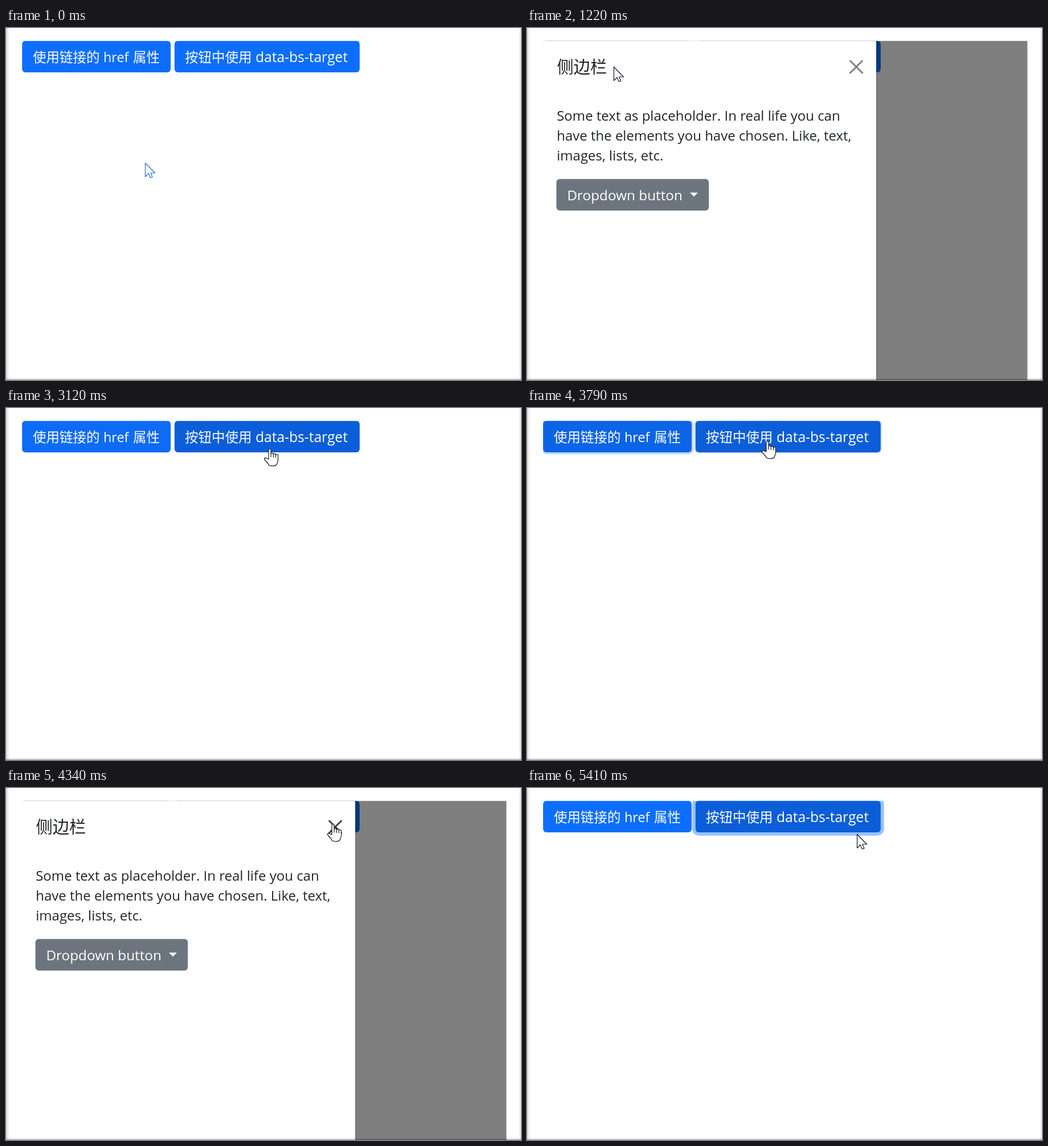
An HTML page with a canvas for the animation above (5.49 s loop, 904 by 619 pixels).

```html
<!DOCTYPE html>
<html lang="zh-CN">
<head>
<meta charset="utf-8">
<title>Offcanvas demo</title>
<style>
html, body { margin: 0; width: 100%; height: 100%; overflow: hidden; background: #fff; }
canvas { display: block; }
</style>
</head>
<body>
<canvas id="stage" width="904" height="619"></canvas>
<script>
const ctx = document.getElementById('stage').getContext('2d');
const LOOP = 5490, STEP = 67.7, REM = 23.4;
const VIEW = { x: 28, y: 22.4, w: 850.6, h: 597 };
const PANEL_W = 585, SLIDE = 300, FADE = 150;
const BUTTON_Y = 22.4, BUTTON_H = 55.5;
const VISITS = [{ open: 870, close: 2765, press: 2630 }, { open: 3826, close: 4900, press: 4800 }];

// Pointer path: time, x, y
const PATH = [
  [0, 244, 237], [340, 203, 150], [610, 152, 66], [1150, 152, 66], [1215, 152, 68],
  [1420, 152, 68], [1624, 435, 65], [1760, 435, 65], [2110, 595, 72], [2500, 595, 72],
  [2570, 591, 72], [2772, 591, 72], [3114, 463, 71], [3250, 452, 65], [3385, 422, 58],
  [3980, 422, 58], [4265, 564, 63], [4330, 574, 63], [5280, 574, 63], [5345, 576, 72],
  [5410, 579, 81], [LOOP, 579, 81]
];
const ARROW = new Path2D('M.5 .5V24.5L6 19L9.5 26.5L13 25L9.7 18H17.5Z');
const HAND = new Path2D('M-2 19V2.6a2 2 0 0 1 4 0V10a2.1 2.1 0 0 1 4.3 1a2.1 2.1 0 0 1 4.2 1' +
  'a2 2 0 0 1 4 1.5V21c0 3-1.5 4-2 6.5q-1 3.5-8 3.5t-7-3.5L-9 20c-1.5-3 1.5-4.5 3.5-2.5z' +
  'M2 10v5.5M6.3 11v5M10.5 12v4.5');

const clamp = v => Math.min(1, Math.max(0, v));
const mix = (a, b, k) => a + (b - a) * k;

// cubic-bezier(.42, 0, .58, 1)
function easeInOut(x) {
  let lo = 0, hi = 1;
  for (let i = 0; i < 20; i++) {
    const s = (lo + hi) / 2, r = 1 - s;
    if (1.26 * s * r * r + 1.74 * s * s * r + s ** 3 < x) lo = s; else hi = s;
  }
  return lo * lo * (3 - 2 * lo);
}
const ramp = (t, start, length) => easeInOut(clamp((t - start) / length));
const pulse = (t, on, off, length = FADE) => ramp(t, on, length) - ramp(t, off, length);

function pointerAt(t) {
  const i = Math.max(1, PATH.findIndex(p => p[0] > t));
  const [t0, x0, y0] = PATH[i - 1], [t1, x1, y1] = PATH[i];
  const k = (t - t0) / (t1 - t0);
  return { x: Math.round(mix(x0, x1, k)), y: Math.round(mix(y0, y1, k)) };
}

function box(x, y, w, h, r, color) {
  ctx.fillStyle = color;
  ctx.beginPath();
  ctx.roundRect(x, y, w, h, r);
  ctx.fill();
}

function text(str, x, y, size, color = '#fff') {
  ctx.font = `${size}px "Open Sans", "Noto Sans CJK SC", "Noto Sans CJK", sans-serif`;
  ctx.fillStyle = color;
  ctx.fillText(str, x, y);
}

function focusRing(x, y, w, h, color) {
  const spread = REM / 4;
  ctx.fillStyle = color;
  ctx.beginPath();
  ctx.roundRect(x - spread, y - spread, w + 2 * spread, h + 2 * spread, 2 * spread);
  ctx.roundRect(x, y, w, h, spread);
  ctx.fill('evenodd');
}

function primaryButton(x, w, dark, focus) {
  if (focus > 0) {
    const s = focus * REM / 4;
    box(x - s, BUTTON_Y - s, w + 2 * s, BUTTON_H + 2 * s, 6 + s, `rgba(49,132,253,${focus / 2})`);
  }
  const c = [[13, 11], [110, 94], [253, 215]].map(([a, b]) => Math.round(mix(a, b, dark)));
  box(x, BUTTON_Y, w, BUTTON_H, 6, `rgb(${c})`);
}

function page(t) {
  const focus1 = pulse(t, 670, 1060) + pulse(t, 3070, 3725);
  const focus2 = pulse(t, 3725, 4130) + ramp(t, 5210, FADE);
  const dark1 = Math.max(pulse(t, 545, 1060), focus1);
  const dark2 = Math.max(pulse(t, 2920, 4130), ramp(t, 5050, FADE));
  primaryButton(28.2, 260.8, dark1, focus1);
  primaryButton(295.8, 325, dark2, focus2);
  text('使用链接的', 47, 60, 23.5);
  text('href', 171, 60, 23.4);
  text('属性', 223, 60, 23.5);
  text('按钮中使用', 314, 60, 23.5);
  text('data-bs-target', 438, 60, 24.6);
}

function panel(x, closeHover, closeFocus) {
  const ink = '#212529';
  ctx.save();
  ctx.translate(x, 0);
  box(0, VIEW.y, PANEL_W, VIEW.h, 0, '#fff');
  box(PANEL_W, VIEW.y, 1, VIEW.h, 0, 'rgba(0,0,0,.2)');
  text('侧边栏', 24.4, 79, 29.3, ink);
  text('Some text as placeholder. In real life you can', 24.2, 163, 24, ink);
  text('have the elements you have chosen. Like, text,', 24.2, 198, 24, ink);
  text('images, lists, etc.', 24.2, 233, 24, ink);

  box(23.6, 265.4, 267.6, BUTTON_H, 6, '#6c757d');
  text('Dropdown button', 42.4, 303, 24.3);
  ctx.beginPath();
  ctx.moveTo(258, 289.5);
  ctx.lineTo(272, 289.5);
  ctx.lineTo(265, 296.5);
  ctx.fill();

  if (closeFocus) focusRing(550 - REM, 68 - REM, 2 * REM, 2 * REM, 'rgba(13,110,253,.25)');
  ctx.strokeStyle = `rgba(0,0,0,${closeFocus ? 1 : closeHover ? .75 : .5})`;
  ctx.lineWidth = 2.9;
  ctx.lineCap = 'round';
  ctx.beginPath();
  for (const d of [-10.6, 10.6]) {
    ctx.moveTo(550 - d, 68.3 - 10.6);
    ctx.lineTo(550 + d, 68.3 + 10.6);
  }
  ctx.stroke();
  ctx.restore();
}

function pointer({ x, y }, hand, color) {
  const shape = hand ? HAND : ARROW;
  ctx.save();
  ctx.translate(x, y);
  ctx.fillStyle = '#fff';
  ctx.strokeStyle = color;
  ctx.lineWidth = 1.2;
  ctx.lineJoin = 'round';
  ctx.fill(shape);
  ctx.stroke(shape);
  ctx.restore();
}

function windowFrame() {
  box(0, 0, 4, 619, 0, '#f0f0f0');
  box(0, 0, 1, 619, 0, '#bdbdbd');
  box(3, 0, 1, 619, 0, '#dcdcdc');
  box(902, 0, 1, 619, 0, '#d0d0d0');
  box(0, 617, 904, 1.5, 0, 'rgba(0,0,0,.33)');
}

function draw(t) {
  const pos = pointerAt(t);
  let shown = 0, shade = 0, closeFocus = false;
  for (const { open, close, press } of VISITS) {
    shown += pulse(t, open, close, SLIDE);
    shade += clamp((t - open) / FADE) - clamp((t - close) / FADE);
    closeFocus ||= t >= press && t < close + SLIDE;
  }
  const panelX = VIEW.x - PANEL_W * (1 - shown);
  const overClose = Math.abs(pos.x - panelX - 550) < REM && Math.abs(pos.y - 68) < REM;
  const overPanel = pos.x < panelX + PANEL_W;
  const inButton = pos.y < 78 && (pos.x < 289 || (pos.x > 296 && pos.x < 621));
  const hand = overPanel ? overClose : inButton && shade <= 0;

  box(0, 0, 904, 619, 0, '#fff');
  ctx.save();
  ctx.beginPath();
  ctx.rect(VIEW.x, VIEW.y, VIEW.w, VIEW.h);
  ctx.clip();
  page(t);
  if (shade > 0) box(VIEW.x, VIEW.y, VIEW.w, VIEW.h, 0, `rgba(0,0,0,${shade / 2})`);
  if (shown > 0) panel(panelX, overClose, closeFocus);
  ctx.restore();
  windowFrame();
  pointer(pos, hand, t < STEP ? '#1a6fd8' : '#16162a');
}

// The picture advances in fixed steps
function tick() {
  const t = performance.now() % LOOP;
  draw(Math.floor((t + 12) / STEP) * STEP % LOOP);
  requestAnimationFrame(tick);
}
tick();
</script>
</body>
</html>
```
